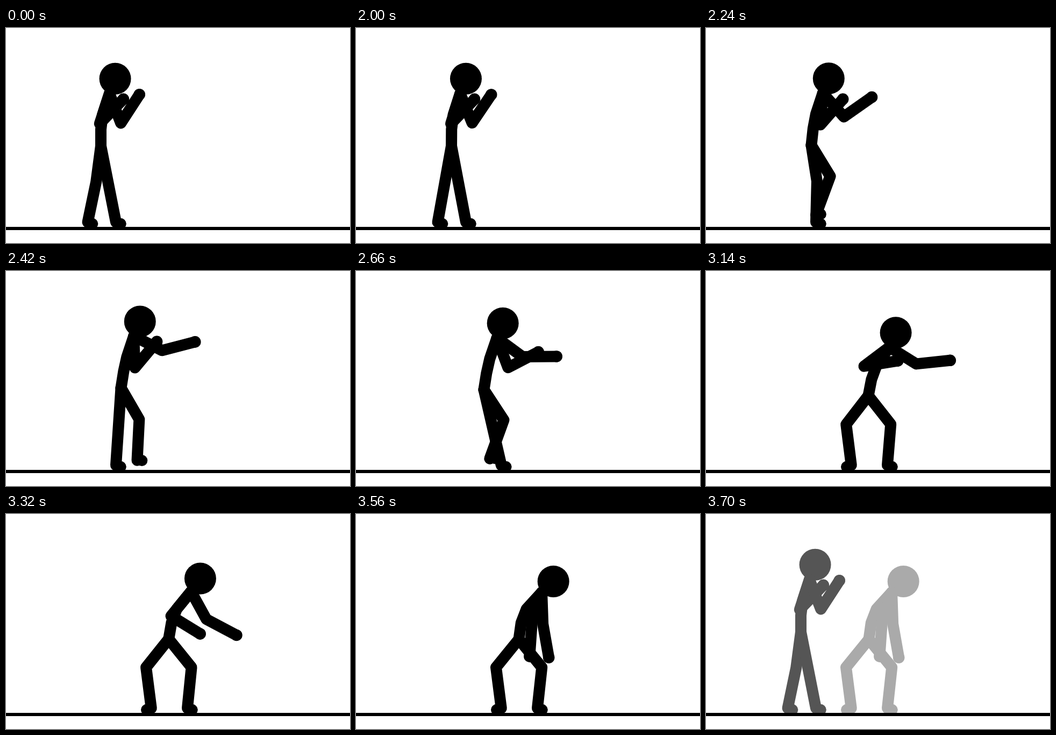
An HTML page with a canvas for the animation above (3.78 s loop, 640 by 400 pixels).

```html
<!DOCTYPE html>
<html lang="en">
<head>
<meta charset="utf-8">
<title>Stick fighter</title>
<style>
html, body { margin: 0; width: 100%; height: 100%; overflow: hidden; background: #fff; }
canvas { display: block; width: 640px; height: 400px; }
</style>
</head>
<body>
<canvas id="stage" width="640" height="400"></canvas>
<script>
const ctx = document.getElementById('stage').getContext('2d');
const LOOP = 3780, START = 2000, STEP = 60, FADE_END = 3700, LAST = 27;
const LIMB = 21, FIST = 10.8, HEAD = 29.5;
const LOIN = 31, BACK = 68.5, NECK = 29.5, UPPER = 59, FORE = 63.5, THIGH = 67.5, SHIN = 76.5;
const GROUND = 361.3, LIFT = 14;

// Key poses. Spine leans from upright, arms are [upper, fore] from level; all in degrees.
const poses = [
  { at: 0,  hip: [176.5, 219.5], spine: [0, 13.5, 21], rear: [108, -46], lead: [69, -57] },
  { at: 8,  hip: [214, 217.5],   spine: [9, 16, 23],   rear: [88, -50],  lead: [27, -14.5] },
  { at: 10, hip: [226, 222],     spine: [9, 16, 24],   rear: [92, -43],  lead: [8, 0] },
  { at: 16, hip: [264, 217.5],   spine: [9, 19, 16],   rear: [5, 1],     lead: [128, -3] },
  { at: 20, hip: [302, 232],     spine: [11, 29, 24],  rear: [32, -6],   lead: [143, -9] },
  { at: 27, hip: [303, 233],     spine: [8, 34, 47],   rear: [88, 80],   lead: [108, 94] }
];
// Each foot takes one stride; the rear leg turns outward during its turn.
const feet = [
  { from: 152, to: 270.3, start: 1, end: 10, turn: [12, 20] },
  { from: 204.5, to: 337.5, start: 9, end: 18 }
];

const mix = (a, b, k) => a + (b - a) * k;
const progress = (n, a, b) => Math.min(1, Math.max(0, (n - a) / (b - a)));

// Smooth curve through the poses that never overshoots and rests at both ends.
function pose(n, part, i) {
  const end = poses.length - 1;
  const value = k => poses[k][part][i];
  const slope = k => (value(k + 1) - value(k)) / (poses[k + 1].at - poses[k].at);
  const tangent = k => {
    if (k === 0 || k === end) return 0;
    const a = slope(k - 1), b = slope(k);
    return a * b > 0 ? 2 * a * b / (a + b) : 0;
  };
  let k = 0;
  while (k < end - 1 && n >= poses[k + 1].at) k++;
  const h = poses[k + 1].at - poses[k].at, s = (n - poses[k].at) / h;
  return mix(value(k), value(k + 1), s * s * (3 - 2 * s))
    + h * s * (1 - s) * ((1 - s) * tangent(k) - s * tangent(k + 1));
}

function extend([x, y], length, degrees) {
  const a = degrees * Math.PI / 180;
  return [x + length * Math.cos(a), y + length * Math.sin(a)];
}

// Knee between hip and ankle; bend is 1 forward, -1 backward.
function kneeAt([hx, hy], [ax, ay], bend) {
  const dx = ax - hx, dy = ay - hy, d = Math.hypot(dx, dy);
  const along = Math.min(THIGH, (d * d + THIGH * THIGH - SHIN * SHIN) / (2 * d));
  const out = bend * Math.sqrt(THIGH * THIGH - along * along);
  return [hx + (dx * along + dy * out) / d, hy + (dy * along - dx * out) / d];
}

function line(...pts) {
  ctx.beginPath();
  pts.forEach(p => ctx.lineTo(...p));
  ctx.stroke();
}

function disc([x, y], r) {
  ctx.beginPath();
  ctx.arc(x, y, r, 0, Math.PI * 2);
  ctx.fill();
}

function drawLeg(n, hip, { from, to, start, end, turn }) {
  const s = progress(n, start, end);
  const lift = LIFT * Math.sin(Math.PI * s);
  const bend = turn ? Math.cos(Math.PI * progress(n, ...turn)) : 1;
  const ankle = [mix(from, to, s), GROUND - lift];
  line(hip, kneeAt(hip, ankle, bend), ankle);
  disc([ankle[0] + 8.8 * bend, ankle[1] + 3 - lift * 0.3], LIMB / 2);
}

function drawArm(n, neck, part) {
  const elbow = extend(neck, UPPER, pose(n, part, 0));
  const hand = extend(elbow, FORE, pose(n, part, 1));
  line(neck, elbow, hand);
  disc(hand, FIST);
}

function figure(n, color) {
  ctx.fillStyle = ctx.strokeStyle = color;
  ctx.lineWidth = LIMB;
  ctx.lineCap = ctx.lineJoin = 'round';
  const hip = [pose(n, 'hip', 0), pose(n, 'hip', 1)];
  const [loin, back, nod] = [0, 1, 2].map(i => pose(n, 'spine', i) - 90);
  const waist = extend(hip, LOIN, loin);
  const neck = extend(waist, BACK, back);

  // The back curves from the hip line into the shoulders.
  const chest = extend(waist, BACK * 0.4, (loin + back) / 2);
  line(hip, waist, chest, neck);
  disc(extend(neck, NECK, nod), HEAD);
  drawArm(n, neck, 'rear');
  drawArm(n, neck, 'lead');
  feet.forEach(foot => drawLeg(n, hip, foot));
}

function draw(t) {
  ctx.fillStyle = '#fff';
  ctx.fillRect(0, 0, 640, 400);
  const n = t < START ? 0 : 1 + Math.floor((t - START) / STEP);
  if (n <= LAST) {
    figure(n, '#000');
  } else {
    const late = t >= FADE_END;
    figure(LAST, late ? '#aaa' : '#555');
    figure(0, late ? '#555' : '#aaa');
  }
  ctx.fillStyle = '#000';
  ctx.fillRect(0, 370, 640, 6);
}

const begin = performance.now();
function tick() {
  draw((performance.now() - begin) % LOOP);
  requestAnimationFrame(tick);
}
tick();
</script>
</body>
</html>
```
